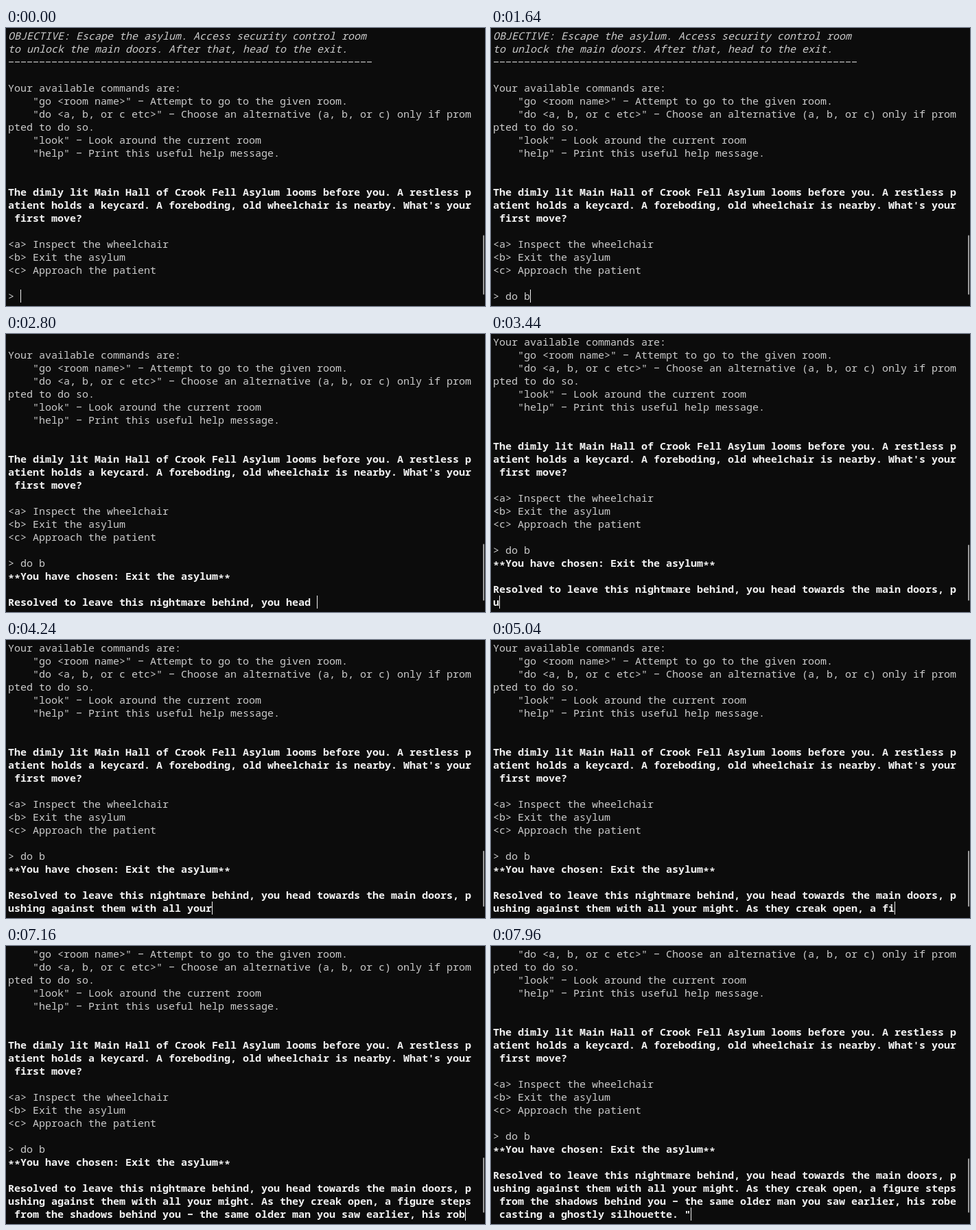
Recreate the animation shown at these times as an HTML page. Size 698x406 px, loop 8 s.

```html
<!DOCTYPE html>
<html lang="en">
<head>
<meta charset="utf-8">
<title>Terminal adventure</title>
<style>
  html, body { margin: 0; width: 100%; height: 100%; overflow: hidden; background: #0c0c0c; }
  svg { display: block; width: 698px; height: 406px; }
  text { font: 400 15px "Noto Sans Mono", "DejaVu Sans Mono", monospace; fill: #ccc; white-space: pre; }
  .bold { font-weight: 600; fill: #f2f2f2; }
  .italic { font-style: italic; }
</style>
</head>
<body>
<svg id="stage" viewBox="0 0 698 406">
  <rect width="698" height="406" fill="#0c0c0c"/>
  <g id="rows"></g>
  <rect id="thumb" x="695" width="2" rx="1" fill="#9c9c9c"/>
  <rect id="cursor" width="1" height="19" fill="#f2f2f2"/>
</svg>
<script>
const NS = "http://www.w3.org/2000/svg";
const COLS = 75, CELL = 9, LINE = 19, LEFT = 3, TOP = 2, LAST = 20;
const LOOP = 8000, TICK = 40, ENTER = 1680;

const wrap = s => s.match(/.{1,75}/g) || [""];
const byId = id => document.getElementById(id);

// [text, style] for each paragraph; long ones wrap at the screen edge
const page = [
  ["OBJECTIVE: Escape the asylum. Access security control room", "italic"],
  ["to unlock the main doors. After that, head to the exit.", "italic"],
  ["−".repeat(59)],
  [""],
  ["Your available commands are:"],
  ['    "go <room name>" − Attempt to go to the given room.'],
  ['    "do <a, b, or c etc>" − Choose an alternative (a, b, or c) only if prompted to do so.'],
  ['    "look" − Look around the current room'],
  ['    "help" − Print this useful help message.'],
  [""],
  [""],
  ["The dimly lit Main Hall of Crook Fell Asylum looms before you. A restless patient holds a keycard. " +
   "A foreboding, old wheelchair is nearby. What's your first move?", "bold"],
  [""],
  ["<a> Inspect the wheelchair"],
  ["<b> Exit the asylum"],
  ["<c> Approach the patient"],
  [""]
];
const fixed = page.flatMap(([s, style]) => wrap(s).map(line => [line, style]));

const command = "do b";
const keys = [1160, 1200, 1400, 1480];
const chosen = "**You have chosen: Exit the asylum**";
const story = "Resolved to leave this nightmare behind, you head towards the main doors, " +
  "pushing against them with all your might. As they creak open, a figure steps from the shadows " +
  "behind you − the same older man you saw earlier, his robe casting a ghostly silhouette. \"";

// typing pace: [ms, characters shown]
const pace = [[ENTER, 2], [2800, 50], [3440, 76], [5040, 140], [6080, 181], [7240, 228], [7960, 257]];

function typed(t) {
  let i = 1;
  while (i < pace.length - 1 && t >= pace[i][0]) i++;
  const [t0, n0] = pace[i - 1], [t1, n1] = pace[i];
  return Math.min(story.length, Math.floor(n0 + (n1 - n0) * (t - t0) / (t1 - t0) + 0.2));
}

const slots = Array.from({ length: LAST + 1 }, (_, i) => {
  const el = document.createElementNS(NS, "text");
  el.setAttribute("x", LEFT);
  el.setAttribute("y", TOP + 15 + i * LINE);
  byId("rows").append(el);
  return el;
});

function setRow(el, [s, style = ""] = [""]) {
  const key = style + "|" + s;
  if (el.key === key) return;
  el.key = key;
  el.setAttribute("class", style);
  el.textContent = "";
  // asterisks sit at mid height
  let dy = 0;
  for (const part of s.split(/(\*+)/).filter(Boolean)) {
    const span = document.createElementNS(NS, "tspan");
    const want = part[0] === "*" ? 3 : 0;
    if (want !== dy) span.setAttribute("dy", want - dy);
    dy = want;
    span.textContent = part;
    el.append(span);
  }
}

function draw(t) {
  const input = command.slice(0, keys.filter(k => k <= t).length);
  const lines = [...fixed, ["> " + input]];
  let col = 2 + input.length;
  if (t >= ENTER) {
    const out = wrap(story.slice(0, typed(t)));
    lines.push([chosen, "bold"], [""], ...out.map(s => [s, "bold"]));
    col = Math.min(out[out.length - 1].length, COLS - 1);
  }
  const scroll = lines.length - 1 - LAST;
  slots.forEach((el, i) => setRow(el, lines[i + scroll]));

  const top = 302.5 + 1.3 * scroll;
  byId("thumb").setAttribute("y", top);
  byId("thumb").setAttribute("height", 389.5 - top);

  const cursor = byId("cursor");
  cursor.setAttribute("x", LEFT + col * CELL);
  cursor.setAttribute("y", TOP + LAST * LINE);
  cursor.setAttribute("visibility", t >= 120 && t < 640 ? "hidden" : "visible");
}

const start = performance.now();
function frame() {
  const t = (performance.now() - start) % LOOP;
  draw(Math.floor(t / TICK) * TICK);
  requestAnimationFrame(frame);
}
frame();
</script>
</body>
</html>
```
